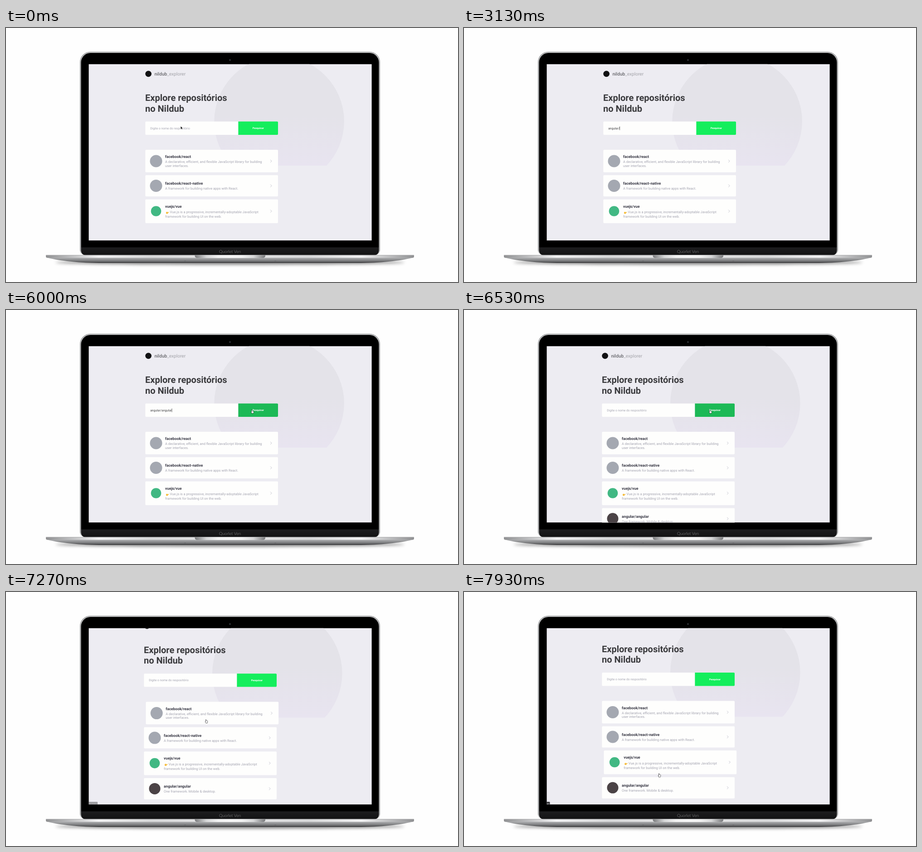
Write an HTML page with a canvas that moves like this. It is 997 by 561 pixels and loops after 8 s.

```html
<!DOCTYPE html>
<html lang="pt">
<head>
<meta charset="utf-8">
<title>nildub_explorer</title>
<style>
html, body { margin: 0; width: 100%; height: 100%; overflow: hidden; background: #fefefe; }
canvas { display: block; width: 997px; height: 561px; }
</style>
</head>
<body>
<canvas id="stage"></canvas>
<script>
const W = 997, H = 561, LOOP = 8000, STEP = 1000 / 15;
const stage = document.getElementById('stage');
const dpr = window.devicePixelRatio || 1;
stage.width = W * dpr;
stage.height = H * dpr;
const c = stage.getContext('2d');
c.scale(dpr, dpr);
c.textRendering = 'geometricPrecision';

const GREY = '#a3a3b0', DARK = '#3a3a3d';
const QUERY = 'angular/angular';
const KEYS = [1670, 1870, 2000, 2200, 2470, 2530, 2600, 3130, 3530, 3730, 3930, 4130, 4330, 4470, 4530];
const SENT = 6470;

const CARDS = [
  { y: 269, h: 49.7, name: 'facebook/react', nameY: 287.2, lineY: [298, 306.7], icon: '#a4a8b1', r: 13.5, iconY: 294,
    lines: ['A declarative, efficient, and flexible JavaScript library for building', 'user interfaces.'], hover: [7060, 7500] },
  { y: 325, h: 47, name: 'facebook/react-native', nameY: 346.4, lineY: [357.2], icon: '#a4a8b1', r: 13.5, iconY: 348.5,
    lines: ['A framework for building native apps with React.'], hover: [7495, 7680] },
  { y: 378.6, h: 52.4, name: 'vuejs/vue', nameY: 396.6, lineY: [409.2, 419], icon: '#41b883', r: 11.3, iconY: 404.5, hand: true,
    lines: ['Vue.js is a progressive, incrementally-adoptable JavaScript', 'framework for building UI on the web.'], hover: [7675, 9000] },
  { y: 437.4, h: 47, name: 'angular/angular', nameY: 458.8, lineY: [469.5], icon: '#4b4346', r: 12.5, iconY: 460.8,
    lines: ['One framework. Mobile & desktop.'], hover: [9000, 9000] }
];

const ramp = (t, a, b) => Math.min(1, Math.max(0, (t - a) / (b - a)));
const smooth = (t, a, b) => { const u = ramp(t, a, b); return u * u * (3 - 2 * u); };
const mix = (a, b, u) => a + (b - a) * u;
const hovered = (t, [on, off]) => smooth(t, on, on + 200) - smooth(t, off, off + 200);

function box(x, y, w, h, r, fill) {
  c.beginPath();
  c.roundRect(x, y, w, h, r);
  c.fillStyle = fill;
  c.fill();
}

function disc(x, y, r, fill) {
  c.beginPath();
  c.arc(x, y, r, 0, 7);
  c.fillStyle = fill;
  c.fill();
}

function text(s, x, y, size, weight, fill, align = 'left', face = 'Roboto') {
  c.font = `${weight} ${size}px ${face}, sans-serif`;
  c.textAlign = align;
  c.fillStyle = fill;
  c.fillText(s, x, y);
  return c.measureText(s).width;
}

function fade(x0, y0, x1, y1, ...cols) {
  const g = c.createLinearGradient(x0, y0, x1, y1);
  cols.forEach((col, i) => g.addColorStop(i / (cols.length - 1), col));
  return g;
}

function lid() {
  box(163, 52.6, 662, 449, [23, 23, 12, 12], '#828385');
  box(164, 53.6, 660, 448, [22, 22, 11, 11], '#d2d3d4');
  box(165.4, 55, 657.2, 446.6, [21, 21, 10, 10], '#000');
  box(166, 484.5, 656, 17, [0, 0, 9, 9], fade(0, 484, 0, 502, '#1d1d1f', '#121213'));
  disc(494, 70.8, 2.3, '#1c1d20');
  disc(494, 70.8, 1, '#3d434c');
  text('Quorlet Ven', 494, 496.6, 9.2, 300, '#98989a', 'center', 'Lato');
}

function base() {
  c.save();
  c.filter = 'blur(3px)';
  c.beginPath();
  c.ellipse(494, 518, 385, 5, 0, 0, 7);
  c.fillStyle = 'rgba(0,0,0,.45)';
  c.fill();
  c.restore();

  c.beginPath();
  c.moveTo(88, 506.5);
  c.bezierCurveTo(112, 513, 150, 518.5, 205, 519);
  c.lineTo(783, 519);
  c.bezierCurveTo(838, 518.5, 876, 513, 900, 506.5);
  c.closePath();
  c.fillStyle = fade(0, 506, 0, 519.5, '#b9babc', '#98999b', '#747577', '#2d2d2f');
  c.fill();

  const side = ['#8f9092', '#f4f4f5', '#d9dadb', '#e4e4e5', '#e4e4e5', '#d9dadb', '#f4f4f5', '#8f9092'];
  box(88, 501.6, 812, 5.8, [1, 1, 3, 3], fade(88, 0, 900, 0, ...side));
  box(88, 501.6, 812, .8, 0, '#a9aaac');
  const lip = ['#77787a', '#d6d7d8', '#f2f2f2', '#f6f6f6', '#f2f2f2', '#d6d7d8', '#77787a'];
  box(416.5, 501.8, 155.5, 6.2, [0, 0, 5, 5], fade(416, 0, 572, 0, ...lip));
  for (const x of [393, 592]) box(x, 514, 4, .8, 0, '#626365');
}

function wave(x, y) {
  c.strokeStyle = '#f5bd3f';
  c.lineCap = 'round';
  c.lineWidth = 1.25;
  c.beginPath();
  for (const [a, b] of [[1.6, 1.5], [3.1, .7], [5.5, .8], [7, 1.8]]) {
    c.moveTo(mix(a, 4.2, .35), 5.5);
    c.lineTo(a, b);
  }
  c.save();
  c.translate(x, y);
  c.stroke();
  c.beginPath();
  c.moveTo(5, 7);
  c.lineTo(8, 4.8);
  c.stroke();
  box(2, 4, 4.3, 4.4, 1.6, '#f5bd3f');
  c.restore();
}

function card(k, t) {
  c.save();
  c.translate(4.2 * hovered(t, k.hover), 0);
  box(307.3, k.y, 292.7, k.h, 2, '#fefefd');
  disc(331, k.iconY, k.r, k.icon);
  text(k.name, 351, k.nameY, 8.36, 700, '#353542');
  k.lines.forEach((s, i) => text(s, k.hand && !i ? 361.6 : 351, k.lineY[i], 7.5, 400, GREY));
  if (k.hand) wave(351, 402);
  c.beginPath();
  c.moveTo(583.2, k.iconY - 2.9);
  c.lineTo(586.1, k.iconY);
  c.lineTo(583.2, k.iconY + 2.9);
  c.lineWidth = .8;
  c.lineCap = 'butt';
  c.strokeStyle = '#b4b4c0';
  c.stroke();
  c.restore();
}

function form(t) {
  const typed = t < SENT ? KEYS.filter(k => t >= k).length : 0;
  const d = hovered(t, [5745, 6970]);
  const green = [[20, 238, 92], [28, 185, 86]];
  const fill = `rgb(${green[0].map((v, i) => Math.round(mix(v, green[1][i], d)))})`;
  box(307.3, 206.6, 205.2, 29.3, [2, 0, 0, 2], '#fefefd');
  box(512.4, 206.6, 87.6, 29.3, [0, 2, 2, 0], fill);
  text('Pesquisar', 556.2, 223.4, 5.57, 700, '#fff', 'center');

  let w = 0;
  if (typed) w = text(QUERY.slice(0, typed), 318.2, 223.7, 6.69, 400, DARK);
  else text('Digite o nome do respositório', 318.2, 223.7, 6.69, 400, GREY);
  const caret = t >= 130 && t < 1130 || t >= 1670 && t < 5070 || t >= 5600 && t < 6070;
  if (caret) box(318.2 + w, 217.4, .7, 8.2, 0, '#222');
}

function page(t) {
  const sent = t >= SENT;
  const scroll = 28.5 * smooth(t, 7100, 7300);
  c.save();
  c.beginPath();
  c.rect(182.3, 79.8, 624.5, 389.7);
  c.clip();
  c.fillStyle = '#edecf2';
  c.fill();
  c.translate(0, -scroll);

  c.save();
  c.beginPath();
  c.rect(182, 0, 625, 304);
  c.clip();
  disc(sent ? 598.3 : 602.6, 206, 143.3, fade(0, 80, 0, 304, '#e4e3e9', '#e4e3e9', '#e8e4f0'));
  c.restore();

  c.translate(sent ? -3 : 0, 0);
  disc(314.1, 101.2, 6.8, '#111113');
  const w = text('nildub', 327.4, 104.6, 10.1, 500, '#67676c');
  text('_explorer', 327.4 + w, 104.6, 10.1, 400, '#a2a2a8');
  text('Explore repositórios', 306.9, 161.4, 20.06, 700, DARK);
  text('no Nildub', 306.9, 184.8, 20.06, 700, DARK);
  form(t);
  CARDS.slice(0, sent ? 4 : 3).forEach(k => card(k, t));
  c.restore();
}

// Link address shown in the lower left corner
function status(t) {
  const k = CARDS.find(k => t >= k.hover[0] && t < k.hover[1]);
  if (!k || t < 7200) return;
  c.save();
  c.beginPath();
  c.rect(182.3, 460, 60, 9.5);
  c.clip();
  c.globalAlpha = mix(.3, 1, ramp(t, 7200, 7530));
  c.font = '400 5px Roboto, sans-serif';
  const right = 202 + c.measureText(k.name).width - c.measureText(CARDS[0].name).width;
  box(120, 463.4, right - 120, 8, [0, 1, 0, 0], '#2b2b2e');
  text(k.name, right - 1.6, 468.8, 5, 400, '#e6e6e8', 'right');
  c.restore();
}

function place(t) {
  if (t < 1670) {
    const u = smooth(t, 200, 470);
    return [mix(385.5, 391, u), mix(217.2, 215, u)];
  }
  if (t < 6800) {
    const u = 1 - (1 - ramp(t, 5200, 6000)) ** 2, v = 1 - u;
    return [mix(391, 543.6, u), v * v * 215 + 2 * u * v * 152 + u * u * 224.5];
  }
  if (t < 7070) {
    const u = ramp(t, 6800, 7066) ** 2;
    return [mix(543.6, 445.2, u), mix(224.5, 283, u)];
  }
  const a = smooth(t, 7070, 7330), b = smooth(t, 7390, 7930);
  return [445.2 - 3.6 * a - 10.4 * b, 283 + 3.2 * a + 118.8 * b];
}

function shape(points, fill, line, width) {
  c.beginPath();
  points.forEach(([x, y]) => c.lineTo(x, y));
  c.closePath();
  c.lineJoin = 'round';
  c.lineWidth = width;
  c.strokeStyle = line;
  c.stroke();
  c.fillStyle = fill;
  c.fill();
}

function pointer(t) {
  if (t >= 1670 && t < 5260) return;
  const [x, y] = place(t);
  const hand = t < 6800 ? x > 512 && y > 206 : y > 269 || (x > 509 && y < 236);
  c.save();
  c.translate(x, y);
  if (hand) {
    shape([[-1.5, -3.6], [-.6, -3.6], [-.5, -1.2], [1.9, -.8], [2.5, -.1], [2.3, 2], [1.6, 3.6], [-1.1, 3.6], [-2.7, .6], [-2.3, .1], [-1.4, .8]],
      '#fff', '#2a2a2c', 1.2);
  } else {
    shape([[0, 0], [0, 5.6], [1.3, 4.5], [2.2, 6.6], [3.1, 6.2], [2.2, 4.2], [4, 4]], '#111', '#fff', .8);
  }
  c.restore();
}

function draw(now) {
  const t = Math.floor((now % LOOP + 4) / STEP) * STEP % LOOP;
  c.fillStyle = '#fefefe';
  c.fillRect(0, 0, W, H);
  lid();
  base();
  page(t);
  status(t);
  pointer(t);
  requestAnimationFrame(draw);
}

const begin = performance.now();
const tick = draw;
draw = now => tick(Math.max(0, now - begin));
requestAnimationFrame(draw);
</script>
</body>
</html>
```
